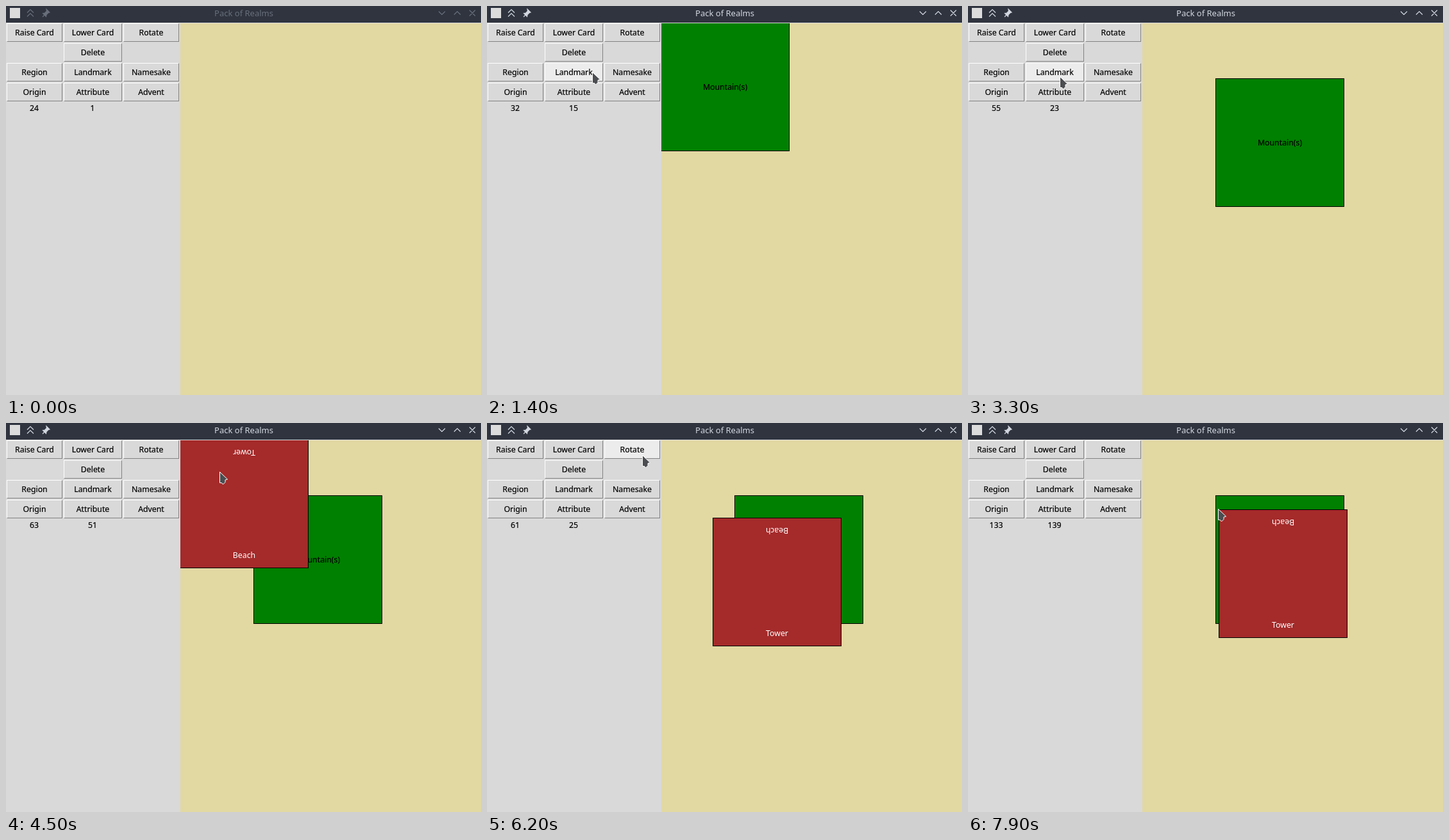
An HTML page for the animation above (8 s loop, 741 by 608 pixels).

```html
<!DOCTYPE html>
<html lang="en">
<head>
<meta charset="utf-8">
<title>Pack of Realms</title>
<style>
  html, body { margin: 0; width: 100%; height: 100%; overflow: hidden; background: #d9d9d9; }
  #stage { position: relative; width: 741px; height: 608px; overflow: hidden;
    font: 500 12.3px/16px "Noto Sans", sans-serif; color: #000; white-space: nowrap; }
  #stage div { position: absolute; box-sizing: border-box; text-align: center; }
  #bar { left: 0; top: 0; width: 741px; height: 26px; background: #2f343f; color: #69707b; }
  #bar.active { color: #d3d8e0; }
  #bar svg, #pointer { position: absolute; left: 0; top: 0; overflow: visible; }
  #name { left: 271px; top: 3px; width: 200px; font-size: 13px; font-weight: 400; line-height: 17px; }
  #panel { left: 1px; top: 27px; display: grid; gap: 2px;
    grid-template-columns: 87px 91px 87px; grid-auto-rows: 29px; }
  #panel, .count { -webkit-text-stroke: .2px #000; }
  #stage #panel div { position: static; }
  .button { line-height: 27px; background: #d9d9d9; border: 1px solid;
    border-color: #fff #828282 #828282 #fff; }
  .button.hover { background: #ececec; }
  .count { top: 152px; width: 60px; }
  #countX { left: 14px; }
  #countY { left: 105px; }
  #table { left: 272px; top: 27px; width: 469px; height: 581px; background: #e2d8a2; overflow: hidden; }
  .card { left: -272px; top: -27px; width: 201px; height: 201px; border: 1px solid #000; }
  #green { background: #008000; line-height: 199px; -webkit-text-stroke: .2px #000; }
  #red { background: #a52a2a; color: #fff; }
  #face { inset: 0; }
  #face div { left: 0; width: 100%; bottom: 11px; }
  #face .far { inset: 0; transform: rotate(180deg); }
  #pointer { margin: -1px 0 0 -1px; }
</style>
</head>
<body>
<div id="stage">
  <div id="bar">
    <svg width="741" height="26" fill="none" stroke="currentColor" stroke-width="1.2">
      <rect x="6" y="3" width="16" height="16" fill="#dcdcdc" stroke="none"/>
      <path d="M33 10.5l5-5 5 5m-10 6l5-5 5 5M675 8.5l5 5 5-5M699 13.500l5-5 5 5M723 6.500l9 9m0-9l-9 9"/>
      <path d="M63 5l5 5-2 .5-3 3-.5 3-2.500-2.500-3 3 3-3-2.500-2.500 3-.500 3-3z" fill="currentColor"/>
    </svg>
    <div id="name">Pack of Realms</div>
  </div>
  <div id="panel"></div>
  <div id="table">
    <div class="card" id="green">Mountain(s)</div>
    <div class="card" id="red">
      <div id="face"><div>Beach</div><div class="far"><div>Tower</div></div></div>
    </div>
  </div>
  <div class="count" id="countX"></div>
  <div class="count" id="countY"></div>
  <svg id="pointer" width="14" height="22">
    <path d="M.5 .5V17.500H3.500L5.500 20 9 16.500V13L12.500 12z" fill="#4b4d50" stroke="#fff" stroke-linejoin="round"/>
  </svg>
</div>
<script>
const $ = id => document.getElementById(id);
const STEP = 100, STEPS = 80;

// an empty label leaves a gap in the grid
const labels = "Raise Card,Lower Card,Rotate,,Delete,,Region,Landmark,Namesake,Origin,Attribute,Advent";
const buttons = labels.split(",").map(label => {
  const el = document.createElement("div");
  el.textContent = label;
  if (label) el.className = "button";
  $("panel").append(el);
  return { el, box: el.getBoundingClientRect() };
}).filter(b => b.el.className);

// pointer legs: first step, last step, then the point reached
const legs = [], home = [250, -19];
const glide = (from, to, x, y) => {
  const start = legs.length ? legs[legs.length - 1].end : home;
  legs.push({ from, to, start, end: [x, y] });
};
glide(1, 9, 32, 103);     // to Region
glide(13, 14, 165, 104);
glide(14, 19, 349, 63);   // to the green card
glide(20, 24, 378, 97);   // drag it
glide(24, 26, 386, 113);
glide(27, 33, 144, 111);  // to Landmark
glide(38, 45, 334, 77);   // to the red card
glide(45, 50, 352, 148);  // drag it
glide(50, 56, 243, 51);   // to Rotate
glide(65, 70, 404, 165);  // back to the red card
glide(70, 73, 426, 150);  // drag it again
glide(73, 74, 409, 138);
glide(74, 79, 391, 135);

const smooth = k => k * k * (3 - 2 * k);
function pointerAt(n) {
  const leg = legs.filter(l => l.from <= n).pop();
  if (!leg) return home;
  const k = smooth(Math.min(1, (n - leg.from) / (leg.to - leg.from)));
  return leg.start.map((v, i) => Math.round(v + (leg.end[i] - v) * k));
}

const between = (n, a, b) => n >= a && n <= b;
const inside = ([x, y], b) => between(x, b.left, b.right) && between(y, b.top, b.bottom);
const table = $("table").getBoundingClientRect();

const states = [];
let green = [271, 26], red = green, count = [24, 1];
for (let n = 0; n < STEPS; n++) {
  const tip = pointerAt(n);
  const hover = buttons.find(b => inside(tip, b.box));
  const dragGreen = between(n, 21, 26);
  const dragRed = between(n, 46, 50) || n > 70;
  const held = dragGreen || dragRed || between(n, 12, 14);
  if (dragGreen) green = tip;
  if (dragRed) red = tip;
  // counters show the tip relative to what lies under it, but freeze while held
  const under = hover ? hover.box : inside(tip, table) && table;
  if (under && !held) count = [tip[0] - under.left + 1, tip[1] - under.top + 1];
  states.push({ tip, hover, green, red, count });
}

const move = (el, [x, y]) => el.style.transform = `translate(${x}px,${y}px)`;
const show = (el, on) => el.style.visibility = on ? "visible" : "hidden";

let last = -1;
function draw(now) {
  const n = Math.floor(now / STEP) % STEPS;
  if (n !== last) {
    const s = states[last = n];
    const turns = (n >= 58) + (n >= 62);
    $("bar").classList.toggle("active", n >= 12);
    buttons.forEach(b => b.el.classList.toggle("hover", b === s.hover));
    move($("green"), s.green);
    move($("red"), s.red);
    show($("green"), n >= 13);
    show($("red"), n >= 36);
    $("face").style.transform = `rotate(${-90 * turns}deg)`;
    $("countX").textContent = s.count[0];
    $("countY").textContent = s.count[1];
    move($("pointer"), s.tip);
  }
  requestAnimationFrame(draw);
}
draw(0);
</script>
</body>
</html>
```
